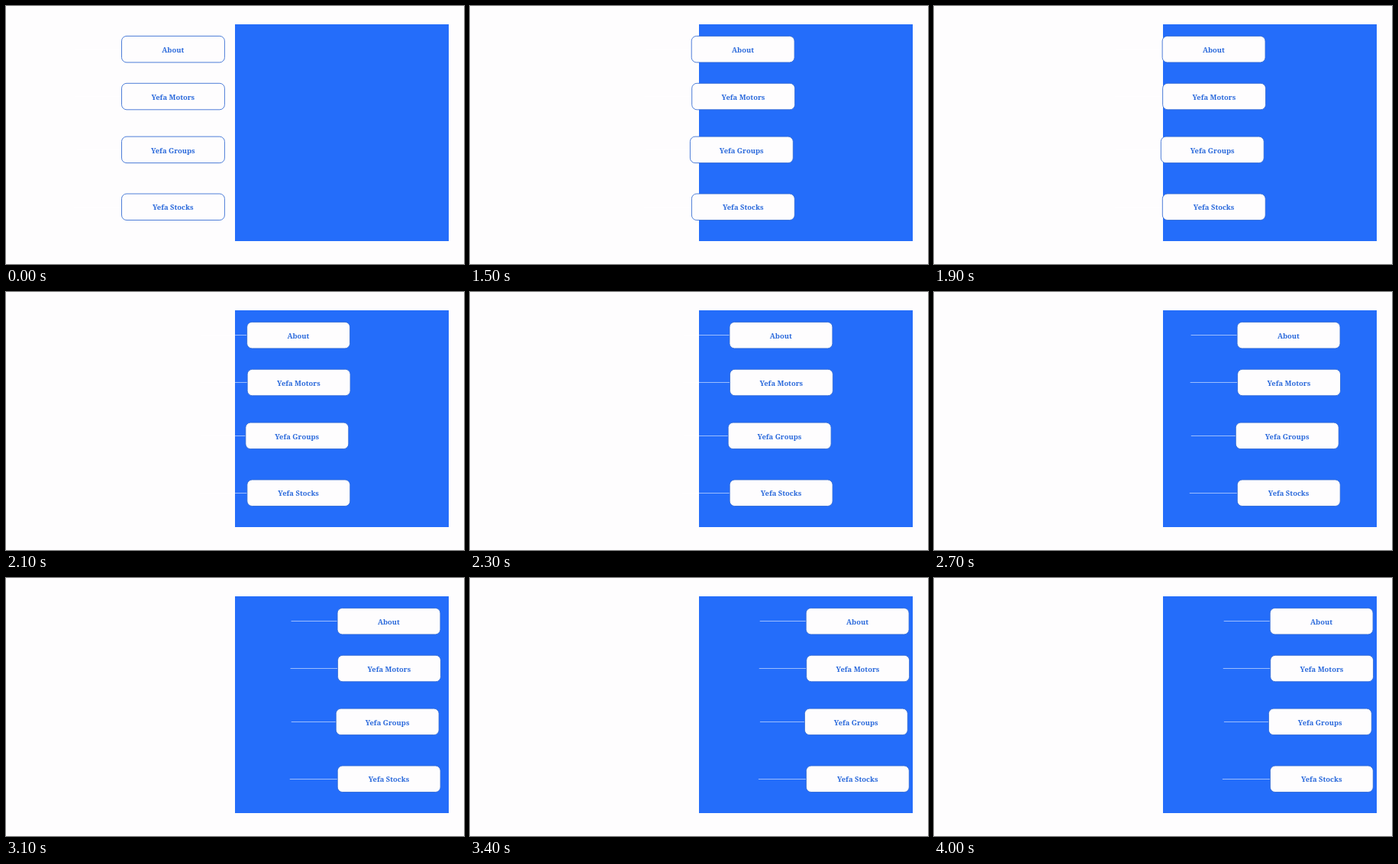
An HTML page for the animation above (5000 ms loop, 600 px wide and 338 px high).

```html
<!DOCTYPE html>
<html lang="en">
<head>
<meta charset="utf-8">
<title>Sliding menu</title>
<style>
  html, body { margin: 0; width: 100%; height: 100%; overflow: hidden; background: #fefdfe; }
  svg { display: block; width: 100vw; height: 100vh; }
  .panel { fill: #246dfa; }
  .card {
    animation: slide 5s infinite paused;
    animation-delay: calc(var(--t, 0) * -1ms);
  }
  .card use { fill: #fefdfe; stroke: #2f68d2; stroke-opacity: .85; }
  .card path { stroke: #fff; stroke-opacity: .55; }
  .card text {
    font: 600 9.4px "Noto Serif", "DejaVu Serif", serif;
    fill: #2a69db;
    text-anchor: middle;
  }
  /* Jump to the panel's edge, then ease across it. */
  @keyframes slide {
    0% { transform: translateX(0); animation-timing-function: step-end; }
    30% { transform: translateX(var(--jump)); animation-timing-function: step-end; }
    32% { transform: translateX(var(--jump)); animation-timing-function: cubic-bezier(.42, 0, .58, 1); }
    67%, 100% { transform: translateX(calc(var(--jump) + 150px)); }
  }
</style>
</head>
<body>
<svg viewBox="0 0 600 338">
  <defs>
    <rect id="box" x="151.5" width="134.9" height="34.5" rx="6.5"/>
  </defs>
  <rect class="panel" x="300" y="24" width="280" height="284"/>
  <g class="card" style="--jump: 138.7px">
    <path d="M91 56.5h60.5"/>
    <use href="#box" y="39.4"/>
    <text x="218.8" y="60.8">About</text>
  </g>
  <g class="card" style="--jump: 139.2px">
    <path d="M89.5 118.5h62"/>
    <use href="#box" y="101.3"/>
    <text x="218.8" y="122.7">Yefa Motors</text>
  </g>
  <g class="card" style="--jump: 136.9px">
    <path d="M93 188.5h58.5"/>
    <use href="#box" y="171.1"/>
    <text x="218.8" y="192.5">Yefa Groups</text>
  </g>
  <g class="card" style="--jump: 138.9px">
    <path d="M89 263.5h62.5"/>
    <use href="#box" y="246"/>
    <text x="218.8" y="267.4">Yefa Stocks</text>
  </g>
</svg>
<script>
  const LOOP = 5000, STEP = 100;
  const root = document.documentElement;
  const start = performance.now();

  // The motion advances ten times a second.
  function tick() {
    const t = (performance.now() - start) % LOOP;
    root.style.setProperty('--t', Math.floor(t / STEP) * STEP);
    requestAnimationFrame(tick);
  }
  tick();
</script>
</body>
</html>
```
